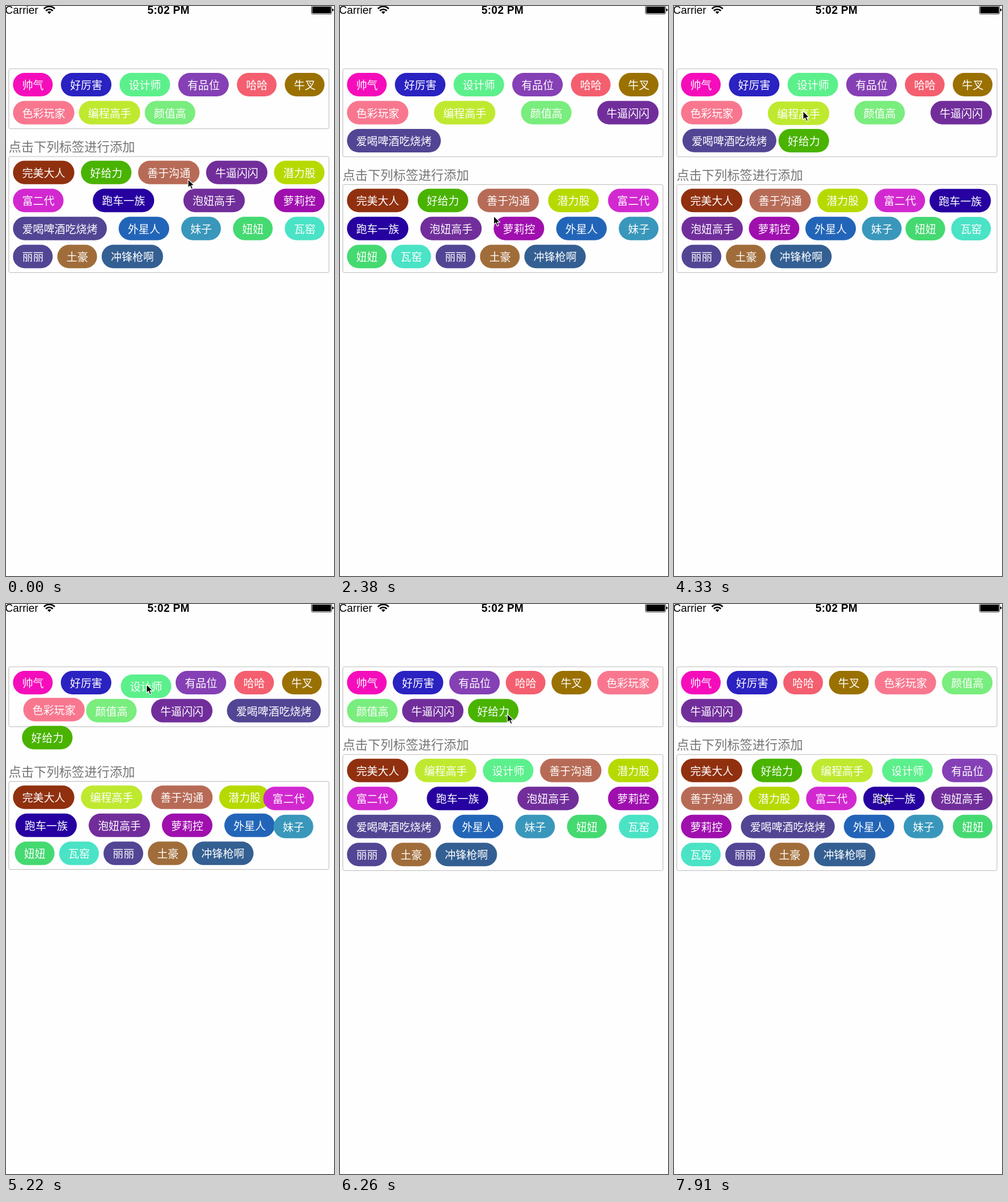
Recreate the animation shown at these times as an HTML page. Size 545 by 946 pixels, loop 8 s.

```html
<!DOCTYPE html>
<html lang="zh-CN">
<head>
<meta charset="utf-8">
<title>标签选择</title>
<style>
  html, body { margin: 0; width: 100%; height: 100%; overflow: hidden; background: #fefefe; }
  #stage { position: relative; width: 545px; height: 946px; overflow: hidden;
    font-family: "Noto Sans CJK SC", "Noto Sans CJK", sans-serif; }
  #stage > * { position: absolute; left: 0; top: 0; }
  #boxes rect { fill: none; stroke: #a6a6a6; stroke-width: .73px; }
  .tag { height: 39.24px; line-height: 38px; border-radius: 20px; color: #fff;
    font-size: 17.9px; text-align: center; white-space: nowrap; }
  #stage > #head { left: 4.2px; font-size: 21px; font-weight: 300; line-height: 30px;
    color: #757575; white-space: nowrap; }
  #bar text { font: 18px "Liberation Sans", Arial, sans-serif; }
  #bar .time { font-weight: bold; letter-spacing: .25px; text-anchor: middle; }
  #cursor { z-index: 9; overflow: visible; }
</style>
</head>
<body>
<div id="stage">
  <svg id="bar" width="545" height="20">
    <text x="-1.5" y="13">Carrier</text>
    <g fill="none" stroke="#000" stroke-width="2.6">
      <path d="M63 4.6A12.5 12.5 0 0 1 81 4.6"/>
      <path d="M66.2 8A8 8 0 0 1 77.8 8"/>
    </g>
    <path d="M72 13.2L68.9 10.1A4.5 4.5 0 0 1 75.1 10.1Z"/>
    <text class="time" x="270" y="13">5:02 PM</text>
    <rect x="507.5" y="-.3" width="33.5" height="13.6" rx="2" fill="none" stroke="#000" stroke-width=".8"/>
    <rect x="508.8" y="1" width="31" height="11" rx="1"/>
    <path d="M542 4.2Q544.4 4.6 544.4 6.5T542 8.8Z"/>
  </svg>
  <svg id="boxes" width="545" height="946">
    <rect id="upper" x="4.7" width="532" rx="2.5"/>
    <rect id="lower" x="4.7" width="532" rx="2.5"/>
  </svg>
  <div id="head">点击下列标签进行添加</div>
  <svg id="cursor" width="12" height="19">
    <path d="M0 0V14.2L3.3 11.2L5.7 16.8L8.1 15.7L5.8 10.4H10.4Z"
      stroke="#fff" stroke-width="1.1" stroke-linejoin="round"/>
  </svg>
</div>
<script>
const LOOP = 8000, STEP = 149.2, MOVE = 300;
const LEFT = 11.6, WIDTH = 518, GAP = 7.27, HEIGHT = 39.24, PITCH = HEIGHT + GAP;
const TOP = 103.8, HEAD_SPACE = 45.4, LINE = .73;

// Order here is the order of the lower list.
const colors = {
  完美大人: '#90300f', 好给力: '#49b300', 编程高手: '#bfe92f', 设计师: '#5cf08c',
  有品位: '#8540b5', 善于沟通: '#b76b56', 牛逼闪闪: '#712e9b', 潜力股: '#b6da00',
  富二代: '#d228d0', 跑车一族: '#2600a0', 泡妞高手: '#712e9b', 萝莉控: '#9f0fae',
  爱喝啤酒吃烧烤: '#524594', 外星人: '#2265b8', 妹子: '#3997bb', 妞妞: '#45d971',
  瓦窑: '#4ae3c6', 丽丽: '#524594', 土豪: '#a06d3a', 冲锋枪啊: '#345f92',
  帅气: '#f50dbb', 好厉害: '#2a22c1', 哈哈: '#f45f6f', 牛叉: '#9a7100',
  色彩玩家: '#f8778f', 颜值高: '#79ed7d'
};
const names = Object.keys(colors);
const firstPicked = ['帅气', '好厉害', '设计师', '有品位', '哈哈', '牛叉', '色彩玩家', '编程高手', '颜值高'];

const clicks = [
  [600, '牛逼闪闪'], [1750, '爱喝啤酒吃烧烤'], [2750, '好给力'], [4309, '编程高手'],
  [5179, '设计师'], [5930, '爱喝啤酒吃烧烤'], [6500, '好给力'], [7540, '有品位']
];

// time, x, y of the pointer tip
const path = [
  [0, 302.5, 287.5], [520, 384, 280], [760, 386, 281], [1492, 450.5, 289.5],
  [1700, 451, 318], [1900, 446, 322], [2387, 255.5, 348.5], [2700, 200, 322],
  [2950, 202, 318], [3432, 223, 228], [3730, 212, 195], [4030, 214.5, 174.5],
  [4330, 214.5, 174.5], [5100, 234, 134], [5222, 233.5, 133.5], [5380, 236, 138],
  [5900, 278, 182.5], [6560, 278, 182.5], [7460, 232, 135], [7560, 234, 138],
  [7908, 344.5, 316.5]
];

const $ = id => document.getElementById(id);
const stage = $('stage');
const widthOf = name => 30.6 + 17.9 * name.length;
const boxHeight = rows => rows * PITCH + GAP;
const mix = (a, b, p) => a + (b - a) * p;
const place = (el, x, y) => { el.style.transform = `translate(${x}px,${y}px)`; };

function frameBox(el, top, height) {
  el.setAttribute('y', top + LINE / 2);
  el.setAttribute('height', height - LINE);
}

// Full rows are justified, the last one is set flush left.
function flow(list, top, spots) {
  const rows = [[]];
  let used = 0;
  for (const name of list) {
    const w = widthOf(name);
    if (used + w > WIDTH) { rows.push([]); used = 0; }
    rows[rows.length - 1].push(name);
    used += w + GAP;
  }
  rows.forEach((row, i) => {
    const sum = row.reduce((s, name) => s + widthOf(name), 0);
    const gap = i < rows.length - 1 ? (WIDTH - sum) / (row.length - 1) : GAP;
    let x = LEFT;
    for (const name of row) {
      spots[name] = [x, top + GAP + i * PITCH];
      x += widthOf(name) + gap;
    }
  });
  return rows.length;
}

function layout(picked) {
  const spots = {};
  const upper = boxHeight(flow(picked, TOP, spots));
  const lowerTop = TOP + upper + HEAD_SPACE;
  const rest = names.filter(name => !picked.includes(name));
  const lower = boxHeight(flow(rest, lowerTop, spots));
  return { spots, upper, lower, lowerTop };
}

let picked = firstPicked;
const states = [layout(picked)];
for (const [, name] of clicks) {
  picked = picked.includes(name) ? picked.filter(n => n !== name) : [...picked, name];
  states.push(layout(picked));
}

const tags = {};
for (const name of names) {
  const el = document.createElement('div');
  el.className = 'tag';
  el.textContent = name;
  el.style.width = widthOf(name) + 'px';
  el.style.background = colors[name];
  stage.append(el);
  tags[name] = el;
}

// cubic-bezier(.42, 0, .58, 1)
function ease(x) {
  if (x <= 0 || x >= 1) return x <= 0 ? 0 : 1;
  let lo = 0, hi = 1, u;
  for (let i = 0; i < 24; i++) {
    u = (lo + hi) / 2;
    const v = 1 - u;
    if (1.26 * u * v * v + 1.74 * u * u * v + u * u * u < x) lo = u; else hi = u;
  }
  return u * u * (3 - 2 * u);
}

function moveCursor(t) {
  let i = 1;
  while (i < path.length - 1 && path[i][0] < t) i++;
  const [t0, x0, y0] = path[i - 1], [t1, x1, y1] = path[i];
  const p = ease((t - t0) / (t1 - t0));
  place($('cursor'), mix(x0, x1, p), mix(y0, y1, p));
}

function draw(t) {
  const done = clicks.filter(([start]) => start <= t).length;
  const to = states[done], from = states[Math.max(0, done - 1)];
  const [start, active] = done ? clicks[done - 1] : [0, ''];
  const p = done ? ease((t - start) / MOVE) : 1;
  for (const name of names) {
    const a = from.spots[name], b = to.spots[name];
    place(tags[name], mix(a[0], b[0], p), mix(a[1], b[1], p));
    tags[name].style.zIndex = name === active && p < 1 ? 2 : 1;
  }
  // Boxes resize at once; only the lower one slides.
  const y = mix(from.lowerTop, to.lowerTop, p);
  frameBox($('upper'), TOP, to.upper);
  frameBox($('lower'), y, to.lower);
  place($('head'), 0, y - 32);
  moveCursor(t);
}

// The picture advances at a low, steady rate.
const origin = performance.now();
function tick() {
  const t = (performance.now() - origin) % LOOP;
  draw(Math.floor((t + 10) / STEP) * STEP);
  requestAnimationFrame(tick);
}
draw(0);
requestAnimationFrame(tick);
</script>
</body>
</html>
```
